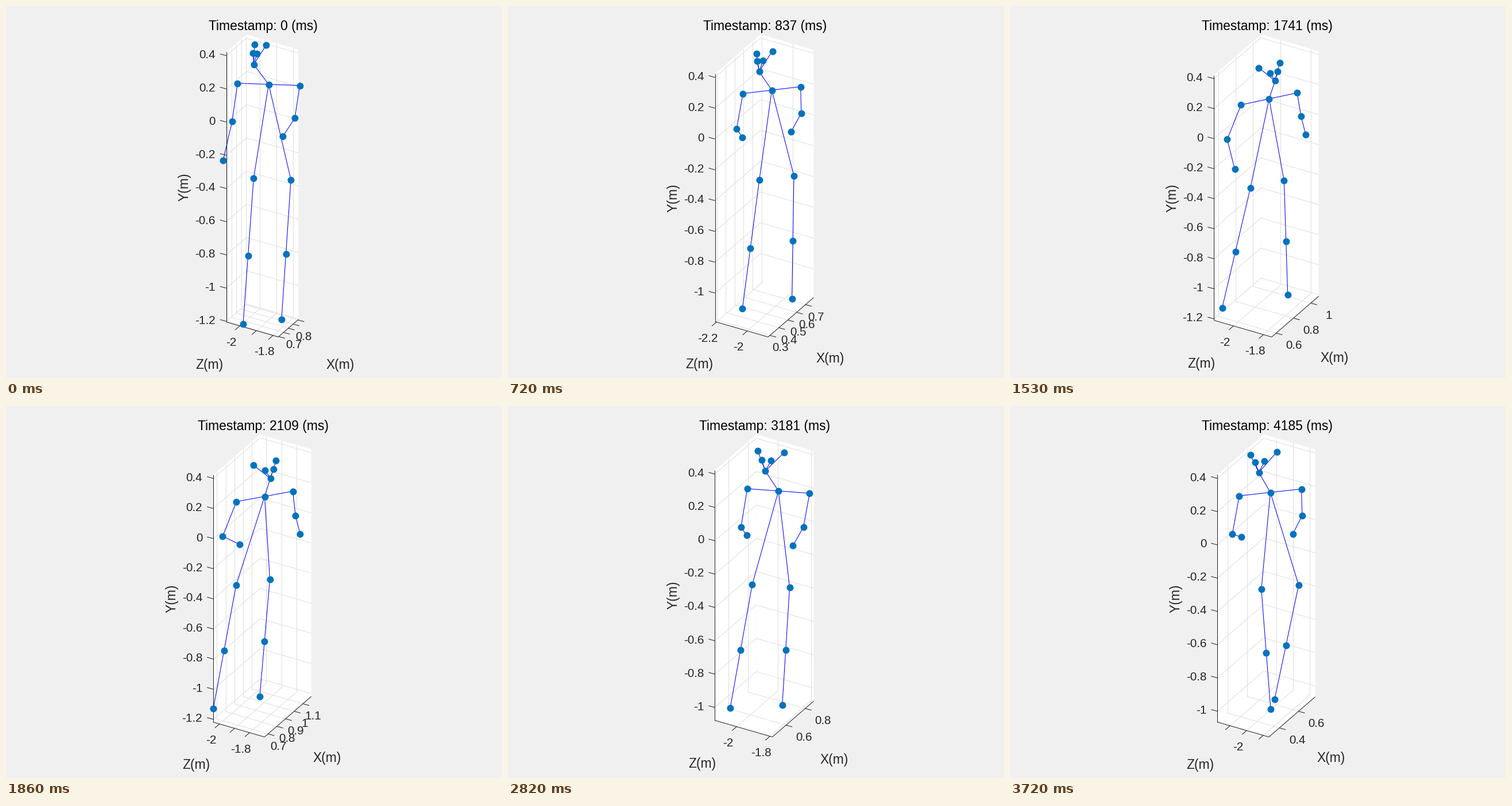
Animation, 864 px wide and 648 px high, one loop 3.75 s. Source, as a matplotlib script:

```python
import numpy as np
import matplotlib.pyplot as plt
from matplotlib.animation import FuncAnimation
from matplotlib.collections import LineCollection

W, H, DPI = 864, 648, 100
FRAMES, INTERVAL = 125, 30
PT = 72 / DPI                 # points per pixel
INK, GRID, DOT, BONE = "#262626", "#dfdfdf", "#0072bd", "#0000ff"
TICK_PX, LABEL_PX = 20.8, 22.9
CENTER, TOP, BOTTOM = 447, 49, 576

# Orthographic view turned and tilted by 30 degrees, relative to the vertical scale.
X_DIR = np.array([1 / np.sqrt(3), -0.5])
Y_DIR = np.array([0, -1.0])
Z_DIR = np.array([1.0, 0.5 / np.sqrt(3)])

KEYS = np.array([0, 24, 40, 62, 81, 107, 124])


def smooth(u):
    u = np.clip(u, 0, 1)
    return u * u * (3 - 2 * u)


def track(*values):
    """Smooth curve through one value per key."""
    v = np.array(values, float)
    slope = np.gradient(v, KEYS)

    def at(i):
        k = min(np.searchsorted(KEYS, i, side="right") - 1, len(KEYS) - 2)
        span = KEYS[k + 1] - KEYS[k]
        u = (i - KEYS[k]) / span
        bend = slope[k] * (1 - u) - slope[k + 1] * u
        return v[k] + (v[k + 1] - v[k]) * smooth(u) + span * u * (1 - u) * bend

    return at


# Where the walker is, in metres.
x_mid = track(0.75, 0.536, 0.669, 0.928, 0.798, 0.568, 0.533)
x_width = track(0.21, 0.512, 0.543, 0.538, 0.545, 0.347, 0.483)
z_mid = track(-1.925, -2.037, -2.013, -1.871, -1.902, -2.01, -2.021)

# How the body is held, in pixels.
neck_x = track(458, 460, 458, 451, 483, 454, 454)
neck_y = track(136, 146, 161, 157, 148, 149, 150)
turn = track(-26, -22, 4, 10, 0, -39, -20)
tilt = track(2, -6, -9, -9, 6, -2, -6)
lean = track(-11, -8, -4, -49, -64, -8, 4)
stride = track(1, 13, 41, 11, 26, -8, -29)


def stamp(i):
    return 0 if i == 0 else round(33.9 + 33.475 * i)


def ranges(i):
    """Axis limits that enclose the walker: y, z, x."""
    x, z = x_mid(i), z_mid(i)
    half_x = x_width(i) / 2
    half_z = (0.31 + 0.0027 * max(stride(i), 0)) / 2
    y_low = -1.14 - 0.085 * x + 0.12 * smooth((i - 62) / 19)
    return y_low, 0.423, z - half_z, z + half_z, x - half_x, x + half_x


def chains(i, scale, floor_y):
    """Joint chains of the body; every one starts at the nose or neck."""
    face, slant, step = turn(i), tilt(i), lean(i)
    neck = np.array([neck_x(i), neck_y(i)])
    side = np.array([0.187 * scale, slant])

    nose = neck + (face, -0.12 * scale)
    ears = np.array([-4 - 0.6 * face, -29 + 0.2 * face])
    ear_side = np.array([min(10 + 0.16 * i, 23), 0.4 * slant])
    eyes = ears * (0.2, 0.56)

    hips = neck + (14 + 0.7 * step, 0.57 * scale)
    feet = np.array([neck[0] + step, floor_y + 10 - 40 * x_width(i)])
    foot_side = 0.6 * side + (stride(i), -5)

    # One forearm is raised once per gait cycle after the walk has begun.
    raised = smooth(i / 20) * np.cos(np.pi * (i - 27) / 32) ** 4
    upper = {-1: (-20 - 0.4 * face, 0.23 * scale), 1: (-6 - 1.2 * slant, 54 + 1.3 * slant)}
    lower = {-1: (0.6 * face + 28 * raised, 68 - 64 * raised), 1: (0.8 * face, 32)}

    parts = [[nose, neck]]
    for s in (-1, 1):
        shoulder = neck + s * side
        elbow = shoulder + upper[s]
        hip, ankle = hips + s * 0.6 * side, feet + s * foot_side
        knee = hip + 0.53 * (ankle - hip)
        parts += [[nose, nose + eyes + s * 0.36 * ear_side],
                  [nose, nose + ears + s * ear_side],
                  [neck, shoulder, elbow, elbow + lower[s]],
                  [neck, hip, knee, ankle]]
    return parts


def ticks(lo, hi, step):
    n = np.arange(np.ceil(lo / step - 1e-6), np.floor(hi / step + 1e-6) + 1)
    return np.round(n * step, 4)


def is_multiple(v, step):
    return abs(v / step - round(v / step)) < 1e-6


def write(x, y, text, px, color=INK, ha="center", rotation=0):
    shift = 0.36 * px
    x, y = (x + shift, y) if rotation else (x, y + shift)
    ax.text(x, y, text, fontsize=px * PT, color=color, ha=ha, va="baseline",
            family="Liberation Sans", rotation=rotation, rotation_mode="anchor")


def lines(paths, color, order):
    ax.add_collection(LineCollection(paths, colors=color, linewidths=1.04 * PT,
                                     zorder=order, capstyle="butt"))


def draw_box(limits):
    """Draws walls, grid and labels; returns the scale and the floor's middle height."""
    y0, y1, z0, z1, x0, x1 = limits
    ly, lz, lx = y1 - y0, z1 - z0, x1 - x0
    scale = (BOTTOM - TOP) / (ly + lz * Z_DIR[1] - lx * X_DIR[1])
    ex, ey, ez = lx * scale * X_DIR, ly * scale * Y_DIR, lz * scale * Z_DIR
    left = np.array([CENTER - (ez[0] + ex[0]) / 2, BOTTOM - ez[1]])
    back, front = left + ex, left + ez
    right = front + ex

    for corner, a, b in ((left, ex, ey), (back, ez, ey), (left, ex, ez)):
        ax.fill(*np.array([corner, corner + a, corner + a + b, corner + b]).T,
                color="white", lw=0, zorder=1)

    # Coarser steps where the labels would crowd.
    z_step = 0.1 if len(ticks(z0, z1, 0.1)) <= 3 else 0.2
    crowded = len(ticks(x0, x1, 0.2)) > 2 or scale > 275
    x_step = 0.05 if lx < 0.3 else 0.2 if crowded else 0.1
    x_gap = 31 if x_step == 0.2 and lx > 0.4 else 18

    grid, marks = [], [(left, left + ey), (left, front), (front, right)]
    for v in ticks(y0, y1, 0.2):
        d = (v - y0) * scale * Y_DIR
        p = left + d
        grid += [(p, back + d), (back + d, right + d)]
        marks.append((p, p + (-11, -3)))
        write(p[0] - 19, p[1] - 3, f"{v + 0:g}", TICK_PX, ha="right")
    for v in ticks(z0, z1, z_step):
        d = (v - z0) * scale * Z_DIR
        p = left + d
        grid += [(p, back + d), (back + d, back + d + ey)]
        marks.append((p, p + (-8, 7)))
        if is_multiple(v, 0.2):
            write(p[0] - 15, p[1] + 27, f"{v:g}", TICK_PX)
    for v in ticks(x0, x1, x_step):
        d = (v - x0) * scale * X_DIR
        p = front + d
        grid += [(p, left + d), (left + d, left + d + ey)]
        marks.append((p, p + (11, 3)))
        if is_multiple(v, 0.1):
            write(p[0] + x_gap, p[1] + 20, f"{v:g}", TICK_PX)
    lines(grid, GRID, 2)
    lines(marks, INK, 3)

    x_edge, z_edge = (front + right) / 2, (left + front) / 2
    narrow = max(80 - ex[0], 0)
    write(x_edge[0] + 68 + 0.5 * narrow, x_edge[1] + 70.5 - 0.19 * narrow, "X(m)", LABEL_PX)
    write(z_edge[0] - 97 + 0.25 * ez[0], z_edge[1] + 60, "Z(m)", LABEL_PX)
    write(left[0] - 74, left[1] + ey[1] / 2, "Y(m)", LABEL_PX, rotation=90)
    return scale, (left[1] + right[1]) / 2


def draw(i):
    ax.clear()
    ax.set_axis_off()
    ax.set_xlim(0.5, W + 0.5)
    ax.set_ylim(H - 0.5, -0.5)
    body = chains(i, *draw_box(ranges(i)))
    lines(body, BONE, 4)
    joints = np.unique(np.vstack(body), axis=0)
    ax.scatter(*joints.T, s=(12 * PT) ** 2, color=DOT, linewidths=0, zorder=5)
    write(CENTER + 1, 33, f"Timestamp: {stamp(i)} (ms)", LABEL_PX, "black")
    return []


fig = plt.figure(figsize=(W / DPI, H / DPI), dpi=DPI, facecolor="#f0f0f0")
ax = fig.add_axes([0, 0, 1, 1])
anim = FuncAnimation(fig, draw, frames=FRAMES, interval=INTERVAL,
                     repeat=True, repeat_delay=0, blit=False)
plt.show()
```
